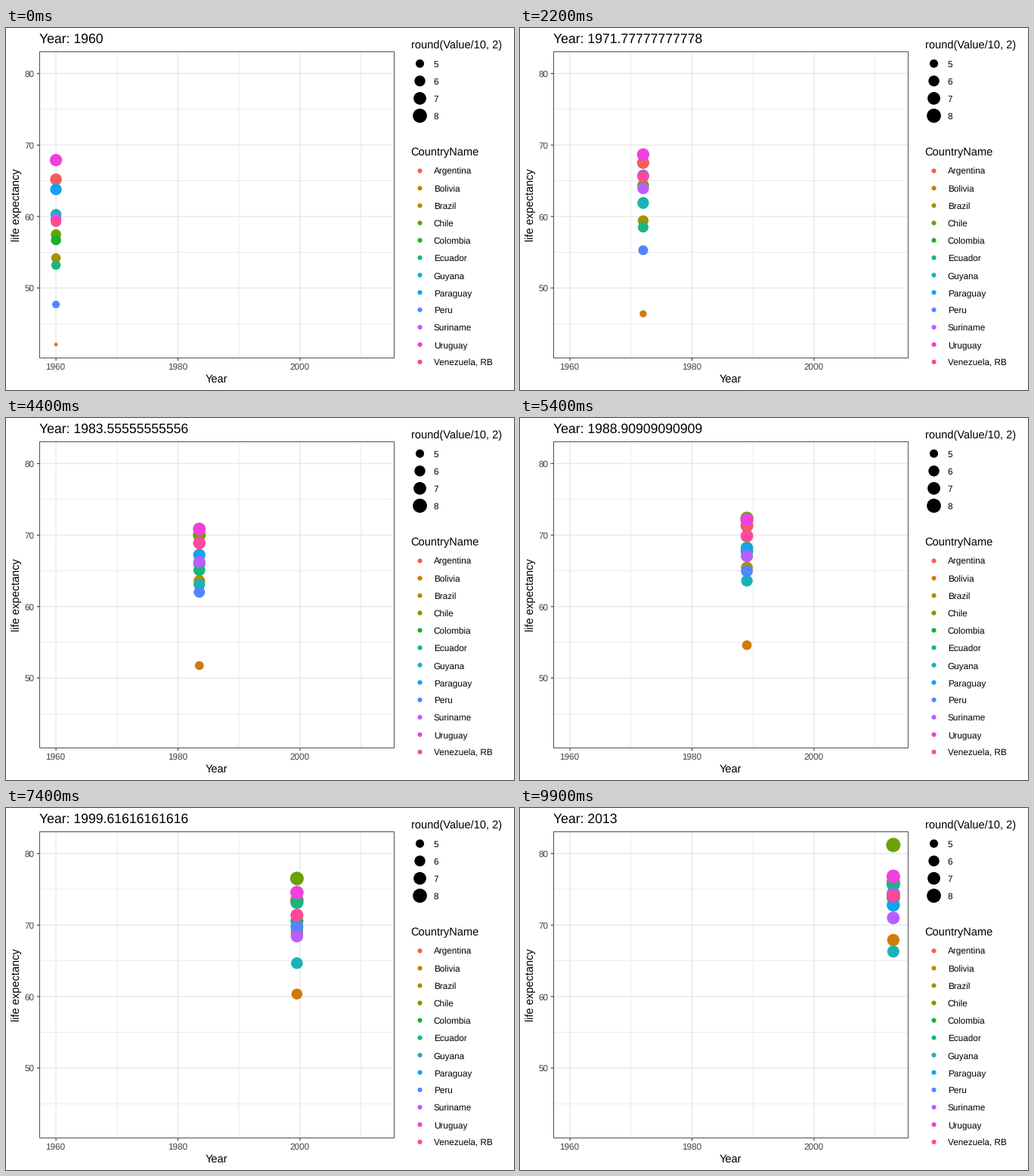
Animation, 672 px wide and 480 px high, one loop 10000 ms. Source, as a matplotlib script:

```python
import numpy as np
import matplotlib.pyplot as plt
from matplotlib.animation import FuncAnimation
from matplotlib.patches import Circle, Rectangle

plt.rcParams["font.family"] = "Liberation Sans"
plt.rcParams["text.hinting"] = "none"
plt.rcParams["path.snap"] = False

W, H, DPI = 672, 480, 96
FRAMES, INTERVAL = 100, 100
FIRST, LAST = 1960, 2013
LEFT, RIGHT, TOP, BOTTOM = 44.5, 513.5, 31.5, 437.5
GRID, BORDER, TICK, TICK_TEXT = "#e7e7e7", "#555555", "#333333", "#444444"
SMALL, NORMAL, LARGE = 8.8, 11, 13.2

# Life expectancy in four years; a cubic joins them
KEY_YEARS = np.array([1960, 1977, 1994, 2013])
COUNTRIES = {
    "Argentina": ("#f35e5a", (65.2, 68.6, 72.4, 76.0)),
    "Bolivia": ("#d17b08", (42.1, 48.6, 57.3, 67.9)),
    "Brazil": ("#a69008", (54.2, 61.3, 67.1, 74.0)),
    "Chile": ("#6ba204", (57.5, 66.9, 74.4, 81.2)),
    "Colombia": ("#17b12b", (56.7, 63.8, 69.1, 73.8)),
    "Ecuador": ("#1ab57c", (53.2, 61.3, 70.8, 75.7)),
    "Guyana": ("#18b3b7", (60.3, 62.4, 64.1, 66.3)),
    "Paraguay": ("#11a4ee", (63.8, 66.4, 68.7, 72.8)),
    "Peru": ("#5086ff", (47.7, 58.3, 67.4, 74.4)),
    "Suriname": ("#b95eff", (59.7, 65.1, 67.7, 71.0)),
    "Uruguay": ("#f040de", (67.9, 69.5, 73.3, 76.8)),
    "Venezuela, RB": ("#fd489c", (59.3, 67.3, 70.6, 74.1)),
}
LOW, HIGH = 42.1, 81.2

# Every year lands on a whole frame
YEARS = np.arange(FIRST, LAST + 1)
YEAR_FRAMES = np.round((YEARS - FIRST) / (LAST - FIRST) * (FRAMES - 1))


def px(year):
    return 66.1 + 8.07 * (year - FIRST)


def py(value):
    return 60.4 + 9.48 * (80 - value)


def point_radius(size):
    return 1.4226 * size + 0.945


def value_radius(value):
    share = np.clip((value - LOW) / (HIGH - LOW), 0, 1)
    return point_radius(1 + 5 * np.sqrt(share))


fig = plt.figure(figsize=(W / DPI, H / DPI), dpi=DPI, facecolor="white")
ax = fig.add_axes([0, 0, 1, 1])
ax.set_xlim(0, W)
ax.set_ylim(H, 0)
ax.axis("off")


def line(x0, y0, x1, y1, color, width, z):
    ax.plot([x0, x1], [y0, y1], color=color, lw=width * 72 / DPI,
            solid_capstyle="butt", snap=False, zorder=z)


def dot(x, y, radius, color):
    return ax.add_patch(Circle((x, y), radius, fc=color, lw=0, zorder=3))


def label(x, y, text, size, color="black", **kw):
    return ax.text(x, y, text, fontsize=size, color=color, va="baseline", **kw)


# Panel
for year in range(1960, 2011, 10):
    major = year % 20 == 0
    x = px(year)
    line(x, TOP, x, BOTTOM, GRID, 1.3 if major else 0.8, 1)
    if major:
        line(x, BOTTOM, x, BOTTOM + 3.7, TICK, 1.07, 4)
        label(x - 0.6, 453.3, str(year), SMALL, TICK_TEXT, ha="center")
for value in range(45, 81, 5):
    major = value % 10 == 0
    y = py(value)
    line(LEFT, y, RIGHT, y, GRID, 1.3 if major else 0.8, 1)
    if major:
        line(LEFT - 3.7, y, LEFT, y, TICK, 1.07, 4)
        label(37.4, y + 4.4, str(value), SMALL, TICK_TEXT, ha="right")
ax.add_patch(Rectangle((LEFT, TOP), RIGHT - LEFT, BOTTOM - TOP, fill=False,
                       ec=BORDER, lw=0.8, snap=False, zorder=4))

label(278.7, 470, "Year", NORMAL, ha="center")
label(18, 234.5, "life expectancy", NORMAL, ha="center", rotation=90,
      rotation_mode="anchor")
title = label(44, 20, "", LARGE)

# Legends
label(535.7, 27, "round(Value/10, 2)", NORMAL)
for i, n in enumerate((5, 6, 7, 8)):
    y = 47.2 + 23.04 * i
    dot(547.5, y, value_radius(10 * n), "black")
    label(565.8, y + 4.4, str(n), SMALL)

label(535.7, 169, "CountryName", NORMAL)
for i, (name, (color, _)) in enumerate(COUNTRIES.items()):
    y = 189.4 + 23.04 * i
    dot(547.5, y, point_radius(1.5), color)
    label(565.8, y + 4.4, name, SMALL)

points = [dot(0, 0, 1, color) for color, _ in COUNTRIES.values()]
curves = [np.polyfit(KEY_YEARS - FIRST, values, 3)
          for _, values in COUNTRIES.values()]


def update(i):
    title.set_text(f"Year: {FIRST + (LAST - FIRST) * i / (FRAMES - 1):.15g}")
    year = np.interp(i, YEAR_FRAMES, YEARS)
    for point, curve in zip(points, curves):
        value = np.polyval(curve, year - FIRST)
        point.center = px(year), py(value)
        point.set_radius(value_radius(value))
    return [title, *points]


anim = FuncAnimation(fig, update, frames=FRAMES, interval=INTERVAL,
                     repeat=True, repeat_delay=0)
plt.show()
```
